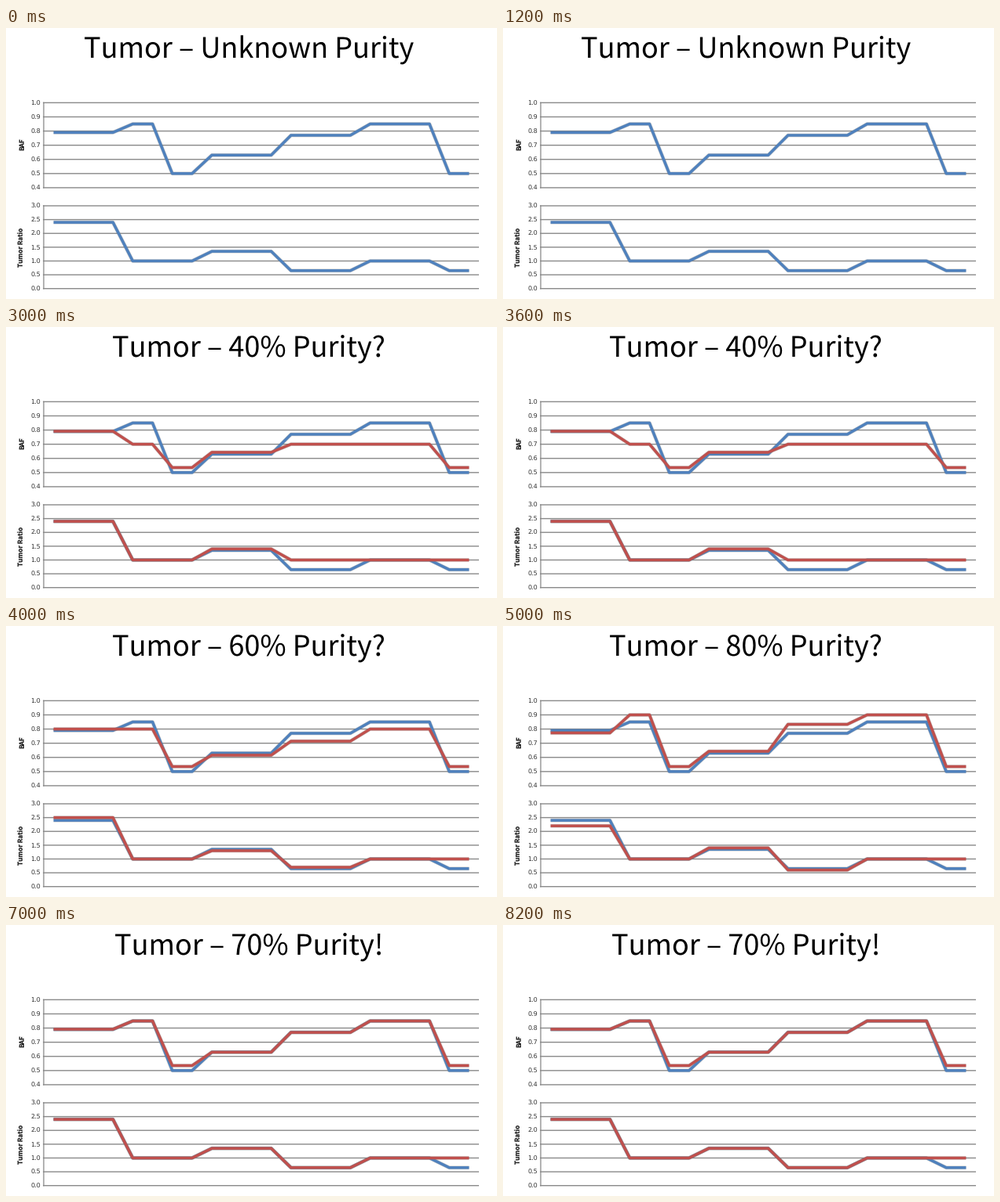
A matplotlib script that plays this animation: 625x346 px, repeating every 9000 ms.

```python
import math
import numpy as np
import matplotlib.pyplot as plt
from matplotlib.animation import FuncAnimation

plt.rcParams["text.hinting"] = "no_hinting"

W, H, DPI = 625, 346, 100
PX = 72 / DPI                      # points per pixel
BLUE, RED, GRID = "#4f81bd", "#c0504d", "#8a8a8a"
LEFT, RIGHT = 48, 602
MAX_COPIES = 9
NOISE_FLOOR = .535                 # lowest BAF a model predicts

# Measured plateaus: chart points, BAF, tumor ratio
SEGMENTS = [(4, .79, 2.4), (2, .85, 1), (2, .5, 1), (4, .63, 1.35),
            (4, .77, .65), (4, .85, 1), (2, .5, .65)]
RUNS, BAF, RATIO = zip(*SEGMENTS)

# One entry per second: title and model purity
STEPS = [("Unknown Purity", None)] * 2
STEPS += [(f"{p}% Purity?", p / 100) for p in (20, 40, 60, 80, 70)]
STEPS += [("70% Purity!", .7)] * 2


def round_half_down(x):
    return math.ceil(x - .5 - 1e-9)


def fit(purity, baf, ratio):
    """BAF and ratio of the nearest whole copy numbers at this purity."""
    normal = 1 - purity
    total = round_half_down(2 * (ratio - normal) / purity)
    if baf == .5 or not 1 <= total <= MAX_COPIES:
        total = 2
    mixed = purity * total + 2 * normal
    major = min(total, round_half_down((baf * mixed - normal) / purity))
    return max(NOISE_FLOOR, (purity * major + normal) / mixed), mixed / 2


fig = plt.figure(figsize=(W / DPI, H / DPI), dpi=DPI, facecolor="white")
ax = fig.add_axes([0, 0, 1, 1])
ax.set_xlim(0, W)
ax.set_ylim(H, 0)
ax.axis("off")


class Panel:
    def __init__(self, name, name_y, top, bottom, high, low, step):
        self.top, self.bottom, self.high, self.low = top, bottom, high, low
        for v in np.arange(low, high + step / 2, step):
            y = self.y(v)
            ax.plot([LEFT - 1, RIGHT], [y, y], color=GRID, lw=1.4 * PX,
                    snap=False, solid_capstyle="butt")
            ax.text(44, y + 3.1, f"{v:.1f}", fontsize=8 * PX, ha="right",
                    va="baseline", family="DejaVu Sans", color="#333333")
        ax.plot([LEFT, LEFT], [top, bottom], color=GRID, lw=1.3 * PX, snap=False)
        ax.text(20.8, name_y, name, fontsize=8.2 * PX, rotation=90, ha="center",
                va="center", family="Noto Sans CJK JP", weight="bold",
                color="#222222")
        self.measured = self.curve(BLUE, 3)
        self.model = self.curve(RED, 5)

    def y(self, v):
        part = (self.high - np.asarray(v)) / (self.high - self.low)
        return self.top + part * (self.bottom - self.top)

    def curve(self, color, z):
        """A soft grey rim and the coloured line above it."""
        styles = [("#777777", .4, 4.6), (color, 1, 3.5)]
        return [ax.plot([], [], color=c, alpha=a, lw=w * PX, snap=False,
                        zorder=z + k, solid_capstyle="butt",
                        solid_joinstyle="round")[0]
                for k, (c, a, w) in enumerate(styles)]

    def show(self, lines, levels):
        v = np.repeat(levels, RUNS)
        slot = (RIGHT - LEFT) / len(v)
        for line in lines:
            line.set_data(LEFT + slot * (np.arange(len(v)) + .5), self.y(v))


panels = [Panel("BAF", 148.5, 95.4, 203.9, 1.0, .4, .1),
          Panel("Tumor Ratio", 279.5, 227, 332.7, 3.0, 0, .5)]
for panel, levels in zip(panels, (BAF, RATIO)):
    panel.show(panel.measured, levels)

title = ax.text(309, 39, "", fontsize=36.1 * PX, ha="center", va="baseline",
                family="Noto Sans CJK JP", color="black")


def update(i):
    text, purity = STEPS[i]
    title.set_text("Tumor – " + text)
    models = [[], []]
    if purity is not None:
        models = zip(*(fit(purity, b, r) for b, r in zip(BAF, RATIO)))
    for panel, levels in zip(panels, models):
        for line in panel.model:
            line.set_visible(purity is not None)
        if purity is not None:
            panel.show(panel.model, levels)
    return [title] + [line for p in panels for line in p.model]


anim = FuncAnimation(fig, update, frames=len(STEPS), interval=1000,
                     repeat=True, repeat_delay=0, blit=False)
plt.show()
```
